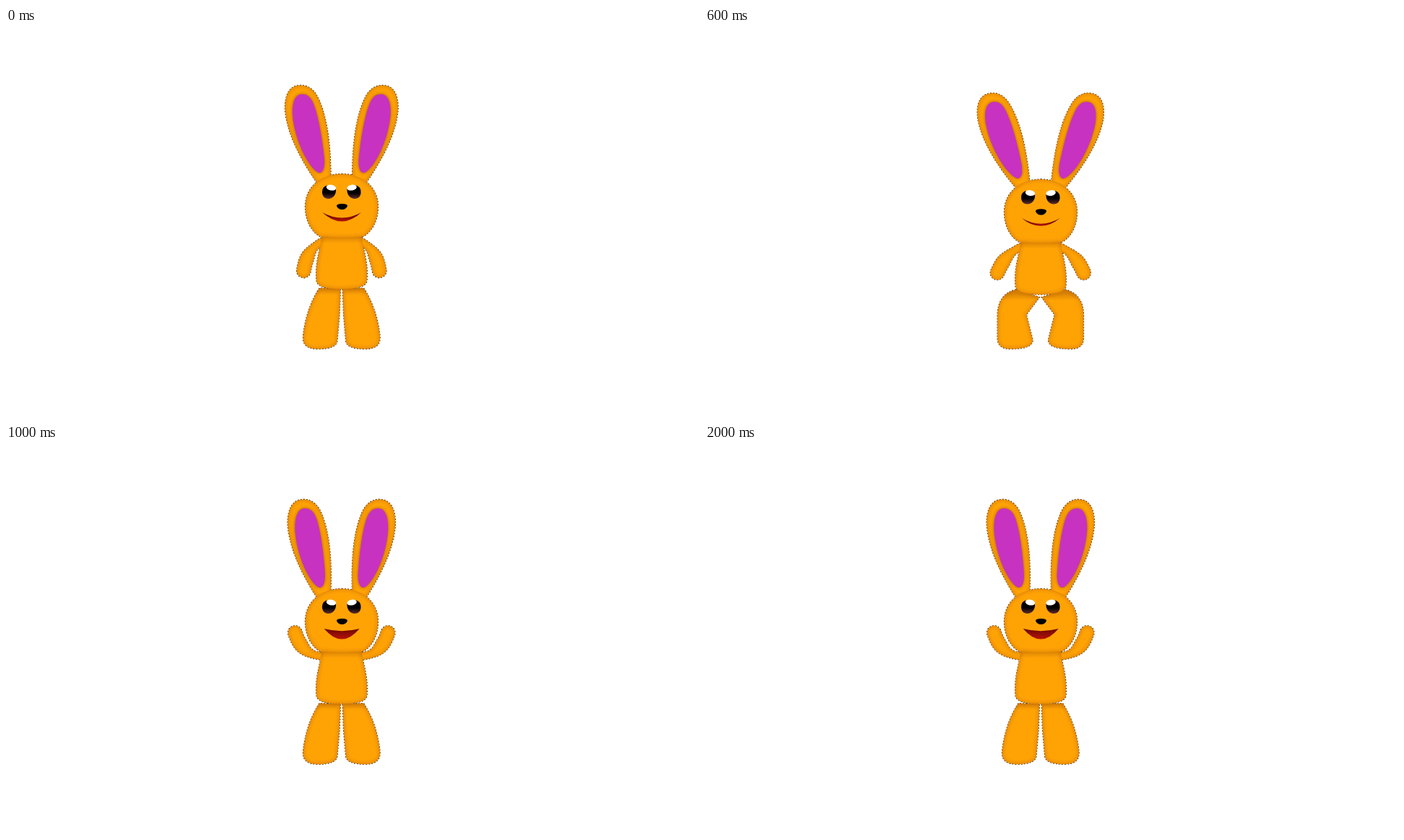
These frames come from a looping animation (960 px wide and 540 px high, 2.1 s). An HTML page with a canvas:

```html
<!DOCTYPE html>
<html lang="en">
<head>
<meta charset="utf-8">
<title>Jumping bunny</title>
<style>
  html, body { margin: 0; width: 100%; height: 100%; overflow: hidden; background: #fff; }
  canvas { display: block; }
</style>
</head>
<body>
<canvas id="stage" width="960" height="540"></canvas>
<script>
const ctx = document.getElementById('stage').getContext('2d');
const LOOP = 2100, STEP = 100, CROUCH_END = 500, JUMP_END = 1000;
const CENTRE = 464.8, DEPTH = 8.7, RISE = 3;

const ear = new Path2D('M450 212C450 172 447 132 435 103C429 87 420 79.500 408 79.500C393 79.500 386 92 386.500 113C389 146 408 182 430 214Z');
const innerEar = new Path2D('M410 92C401 92 396 102 397 121C400 157 419 193 432 200.500C438 203 442 196 441 182C438 152 432 118 425 103C421 95 417 92 410 92Z');
const head = new Path2D('M465 202.500C495 202.500 515.500 222 515.500 248C515.500 266 508 282 495 289.500Q465 293 435 289.500C422 282 414.500 266 414.500 248C414.500 222 435 202.500 465 202.500Z');
const body = new Path2D('M437 287C437 306 428 320 430 350Q430 362.500 465 362.500Q500 362.500 500 350C502 320 493 306 493 287Z');
const eye = new Path2D('M438 228C438 222 441 219 446 218.500L457 223C458 231 453 237 446.500 237C441 237 438 233 438 228Z');
const nose = new Path2D('M458 246.500C458.500 243 472.500 243 473 246.500C472.500 250 469 252 465.500 252C462 252 458.500 250 458 246.500Z');
const glint = new Path2D();
glint.ellipse(450.5, 221.6, 6.8, 3.9, .17, 0, 7);

const mix = (a, b, u) => a + (b - a) * u;
const smooth = u => {
  u = Math.max(0, Math.min(1, u));
  return u * u * (3 - 2 * u);
};
const move = (path, matrix) => {
  const moved = new Path2D();
  moved.addPath(path, matrix);
  return moved;
};
const shift = (path, dy) => move(path, new DOMMatrix([1, 0, 0, 1, 0, dy]));
const mirror = path => move(path, new DOMMatrix([-1, 0, 0, 1, 2 * CENTRE, 0]));
const pair = path => [path, mirror(path)];

function legPath(bend, lift) {
  const heel = 411.5 - 6.5 * bend, toe = 459 - 5 * bend, ground = 445.6;
  return shift(new Path2D(
    `M${434 - 3 * bend} ${361 + 2 * bend}
     Q${415.5 - 11 * bend} ${390 - 21 * bend} ${heel} ${428 - 28 * bend}
     L${heel} 430 Q${heel} ${ground} ${432 - 9 * bend} ${ground}
     Q${toe} ${ground} ${toe} 433
     L${462 - 17 * bend} 398 L463.4 ${362 + 12 * bend}Z`), lift);
}

// A curved limb that swings up from the shoulder and widens towards a round hand
function armPath(raise, dy) {
  const swing = mix(33, 130, raise) * Math.PI / 180, reach = 45 + 7 * Math.sin(swing);
  const sx = 439, sy = 296 + dy;
  const ex = sx - mix(22, 28, raise), ey = sy + mix(10, 0, raise);
  const hx = sx - reach * Math.sin(swing), hy = sy + reach * Math.cos(swing);
  const path = new Path2D(), back = [];
  for (let i = 0; i <= 20; i++) {
    const u = i / 20, v = 1 - u;
    const x = v * v * sx + 2 * u * v * ex + u * u * hx;
    const y = v * v * sy + 2 * u * v * ey + u * u * hy;
    const angle = Math.atan2(v * (ey - sy) + u * (hy - ey), v * (ex - sx) + u * (hx - ex));
    const r = mix(5.3, 9.8, smooth((u - .2) / .55));
    path.lineTo(x + r * Math.sin(angle), y - r * Math.cos(angle));
    back.unshift([x - r * Math.sin(angle), y + r * Math.cos(angle)]);
    if (i === 20) path.arc(x, y, r, angle - Math.PI / 2, angle + Math.PI / 2);
  }
  back.forEach(point => path.lineTo(...point));
  path.closePath();
  return path;
}

function fill(path, color) {
  ctx.fillStyle = color;
  ctx.fill(path);
}

function fade(top, bottom, from, to) {
  const gradient = ctx.createLinearGradient(0, top, 0, bottom);
  gradient.addColorStop(0, from);
  gradient.addColorStop(1, to);
  return gradient;
}

// Orange felt with darker rims; shadowTop adds shade below that height
function felt(path, shadowTop, inner) {
  ctx.save();
  fill(path, '#ffa305');
  ctx.clip(path);
  for (let width = 2; width <= 12; width += 2) {
    ctx.strokeStyle = `rgba(150,70,0,${.17 / width + .01})`;
    ctx.lineWidth = width;
    ctx.stroke(path);
  }
  if (shadowTop) fill(path, fade(shadowTop, shadowTop + 10, 'rgba(140,65,0,.32)', 'rgba(140,65,0,0)'));
  if (inner) {
    ctx.shadowColor = '#a06000';
    ctx.shadowBlur = 5;
    fill(inner, '#c832c0');
  }
  ctx.restore();
}

function drawFace(dy, raise) {
  ctx.save();
  ctx.translate(0, dy);
  pair(eye).forEach(p => fill(p, fade(229, 236, '#000', '#55282a')));
  pair(glint).forEach(p => fill(p, '#fff'));
  fill(nose, '#000');

  const half = mix(27, 24.5, raise), corner = mix(256, 258, raise);
  const upper = 263.5 + .12 * dy - 2 * raise, lower = 268.5 - .2 * dy + 3.5 * raise;
  const lip = (y, x) => `Q${CENTRE + .4} ${2 * y - corner} ${x} ${corner}`;
  const left = CENTRE + .4 - half, right = left + 2 * half;
  fill(new Path2D(`M${left} ${corner}${lip(upper, right)}${lip(lower, left)}Z`),
    fade(upper - 3, lower, '#6c0804', '#b81209'));
  ctx.restore();
}

function draw(now) {
  const time = Math.floor(now % LOOP / STEP) * STEP;
  const raise = smooth((time - CROUCH_END) / (JUMP_END - CROUCH_END));
  const dy = mix(DEPTH * smooth(time / CROUCH_END), -RISE, raise);
  const bend = 1 - (1 - Math.max(0, dy) / DEPTH) ** 2;

  const tilt = new DOMMatrix().translate(438, 207 + dy).rotate(-.73 * dy).translate(-438, -207);
  const ears = pair(move(ear, tilt)), inners = pair(move(innerEar, tilt));
  const legs = pair(legPath(bend, Math.min(0, dy) * .8));
  const arms = pair(armPath(raise, dy));
  const torso = shift(body, dy), face = shift(head, dy);

  ctx.fillStyle = '#fff';
  ctx.fillRect(0, 0, 960, 540);
  ctx.strokeStyle = '#3a2400';
  ctx.lineWidth = 1.3;
  ctx.setLineDash([2, 2]);
  for (const part of [...ears, ...legs, ...arms, torso, face]) ctx.stroke(part);
  ctx.setLineDash([]);

  ears.forEach((p, i) => felt(p, 0, inners[i]));
  legs.forEach(p => felt(p, 361 + dy));
  arms.forEach(p => felt(p));
  felt(torso, 289 + dy);
  felt(face);
  drawFace(dy, raise);
  requestAnimationFrame(draw);
}
requestAnimationFrame(draw);
</script>
</body>
</html>
```
